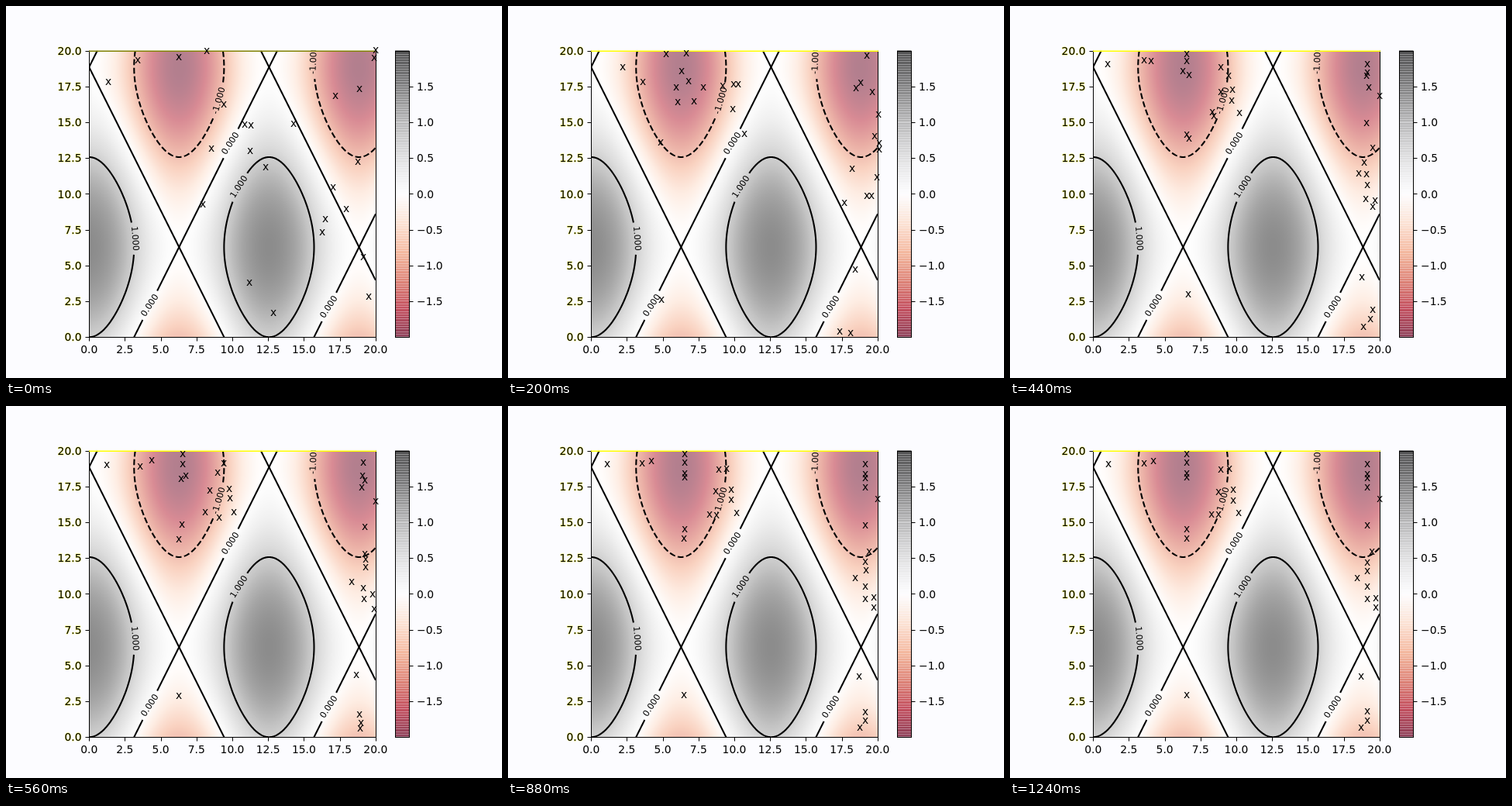
These frames come from a looping animation (640x480 px, 1.28 s). An HTML page with a canvas:

```html
<!DOCTYPE html>
<html lang="en">
<head>
<meta charset="utf-8">
<title>Swarm on a contour map</title>
<style>
html, body { margin: 0; width: 100%; height: 100%; overflow: hidden; background: #fcfcff; }
canvas { display: block; }
</style>
</head>
<body>
<canvas id="stage" width="640" height="480"></canvas>
<script>
const W = 640, H = 480, STEP = 40, STEPS = 32;
const L = 107.2, T = 57.6, SIZE = 369.6, B = T + SIZE, UNIT = SIZE / 20;
const BAR = { x: 501.6, w: 18.5, bins: 256 };
const FONT = '"DejaVu Sans", sans-serif';
const PI = Math.PI, TAU = 2 * PI;
const px = x => L + x * UNIT;
const py = y => B - y * UNIT;
const snap = v => Math.round(v) + .5;
const field = (x, y) => Math.cos(x / 2) + Math.sin(y / 4);

const ramp = ['67001f', 'b2182b', 'd6604d', 'f4a582', 'fddbc7', 'ffffff',
  'e0e0e0', 'bababa', '878787', '4d4d4d', '1a1a1a']
  .map(h => [0, 2, 4].map(i => parseInt(h.slice(i, i + 2), 16)));

function tint(v) {
  const p = Math.min(9.999, Math.max(0, (v + 2) * 2.5));
  const i = Math.floor(p), f = p - i;
  return ramp[i].map((c, k) => c + (ramp[i + 1][k] - c) * f);
}

function layer(w, h) {
  const c = document.createElement('canvas');
  c.width = w;
  c.height = h;
  return c;
}

function heatmap() {
  const n = 370, c = layer(n, n), g = c.getContext('2d');
  const img = g.createImageData(n, n);
  for (let j = 0, o = 0; j < n; j++) {
    for (let i = 0; i < n; i++, o += 4) {
      const v = field((i + .5) / n * 20, 20 - (j + .5) / n * 20);
      img.data.set([...tint(v), 255], o);
    }
  }
  g.putImageData(img, 0, 0);
  return c;
}

// Contour captions: text, centre, angle in degrees
const captions = [
  ['1.000', 167, 300, 86], ['1.000', 300, 233, -57],
  ['0.000', 289, 177, -57], ['0.000', 185, 386, -57], ['0.000', 416, 388, -57],
  ['-1.000', 274, 122, -74], ['-1.000', 396, 70, -88]
];

const inside = v => v >= -.01 && v <= 20.01;
const captioned = (x, y) =>
  captions.some(([s, a, b]) => Math.hypot(x - a, y - b) < s.length * 3.2 + 4.5);

function curve(g, at, from, to, dash = []) {
  let pen = false;
  g.setLineDash(dash);
  g.beginPath();
  for (let i = 0; i <= 600; i++) {
    const [x, y] = at(from + (to - from) * i / 600);
    const X = px(x), Y = py(y);
    if (!inside(x) || !inside(y) || captioned(X, Y)) pen = false;
    else if (pen) g.lineTo(X, Y);
    else { g.moveTo(X, Y); pen = true; }
  }
  g.stroke();
  g.setLineDash([]);
}

// Closed level line |f| = 1 around a peak or a pit
const loop = (cx, cy) => a => {
  const s = Math.sin(a), c = Math.cos(a);
  return [cx + 2 * Math.acos(c * c) * Math.sign(s), cy + 4 * Math.acos(s * s) * Math.sign(c)];
};

function contours(g) {
  g.save();
  g.beginPath();
  g.rect(L, T, SIZE, SIZE);
  g.clip();
  g.lineWidth = 2.08;
  g.lineJoin = 'round';
  for (let k = -1; k <= 2; k++) {
    for (const s of [1, -1]) curve(g, y => [s * (y / 2 + PI) + 2 * TAU * k, y], 0, 20);
  }
  for (const cx of [0, 2 * TAU]) curve(g, loop(cx, TAU), 0, TAU);
  for (const cx of [TAU, 3 * TAU]) curve(g, loop(cx, 3 * TAU), 0, TAU, [7.7, 3.33]);
  g.font = '11.1px ' + FONT;
  g.textAlign = 'center';
  for (const [s, x, y, deg] of captions) {
    g.save();
    g.translate(x, y);
    g.rotate(deg * PI / 180);
    g.fillText(s, 0, 4);
    g.restore();
  }
  g.restore();
}

function segment(g, x1, y1, x2, y2) {
  g.beginPath();
  g.moveTo(x1, y1);
  g.lineTo(x2, y2);
  g.stroke();
}

function label(g, s, x, y, align, fringe) {
  g.textAlign = align;
  if (fringe) {
    g.save();
    g.strokeStyle = fringe;
    g.strokeText(s, x, y);
    g.restore();
  }
  g.fillText(s, x, y);
}

function axes(g) {
  g.lineWidth = 1;
  g.font = '13.89px ' + FONT;
  for (let v = 0; v <= 20; v += 2.5) {
    const x = snap(px(v)), y = snap(py(v)), s = v.toFixed(1);
    segment(g, x, 428, x, 432.5);
    segment(g, 102.5, y, 107, y);
    label(g, s, px(v), 448, 'center');
    label(g, s, 97.5, Math.round(py(v) + 5.2), 'right', 'rgba(255, 255, 0, .6)');
  }
  const right = snap(L + SIZE), bottom = snap(B);
  segment(g, 107.5, T, 107.5, bottom);
  segment(g, right, T, right, bottom + .5);
  segment(g, 107, bottom, right, bottom);

  const edge = snap(BAR.x + BAR.w);
  for (let v = -1.5; v <= 1.5; v += .5) {
    const y = py(10 + v * 5);
    segment(g, edge, snap(y), edge + 5, snap(y));
    label(g, (v < 0 ? '\u2212' : '') + Math.abs(v).toFixed(1), 530, Math.round(y + 5.2), 'left');
  }
  g.strokeRect(snap(BAR.x), snap(T), edge - snap(BAR.x), bottom - snap(T));
}

// Translucent bins overlap at their edges, which gives the fine stripes
function colorbar(g) {
  const h = SIZE / BAR.bins;
  g.globalAlpha = .5;
  for (let i = 0; i < BAR.bins; i++) {
    const y = Math.floor(B - (i + 1) * h);
    g.fillStyle = `rgb(${tint((i + .5) / BAR.bins * 4 - 2)})`;
    g.fillRect(502, y, BAR.w, Math.ceil(B - i * h) - y);
  }
  g.globalAlpha = 1;
}

function backdrop() {
  const c = layer(W, H), g = c.getContext('2d');
  g.fillStyle = '#fcfcff';
  g.fillRect(0, 0, W, H);
  g.fillStyle = '#fff';
  g.fillRect(L, T, SIZE, SIZE);
  g.globalAlpha = .5;
  g.drawImage(heatmap(), L, T, SIZE, SIZE);
  g.globalAlpha = 1;
  colorbar(g);
  g.fillStyle = g.strokeStyle = '#000';
  contours(g);
  axes(g);
  return c;
}

// Resting columns of the swarm: x, then the heights in it
const columns = [
  [127, 75], [173, 74], [185, 71], [228, 62, 73, 87, 92, 159, 171, 373],
  [260, 140], [269, 111, 140], [272, 82], [283, 81], [288, 108, 122], [295, 138],
  [448, 222], [453, 349, 415], [461, 75, 88, 93, 105, 154, 202, 213, 233, 249, 394, 406],
  [467, 188], [472, 248, 260], [477, 120]
];

let seed = 11;
function random() {
  seed = (seed * 16807) % 2147483647;
  return seed / 2147483647;
}

// Damped swing around a resting value
function swing(home, reach) {
  const amp = (random() + random() - 1) * reach;
  const period = 8.5 + random() * 1.5;
  return n => Math.round(home + amp * Math.exp(-.2 * n) * Math.cos(TAU * n / period));
}

const swarm = columns.flatMap(([x, ...ys]) =>
  ys.map(y => ({ x: swing(x, 110), y: swing(y, 130) })));

const g = document.getElementById('stage').getContext('2d');
const base = backdrop();
let shown = -1;

function draw(n) {
  g.drawImage(base, 0, 0);
  g.fillStyle = n ? '#ffff00' : '#808000';
  g.fillRect(107, 57.5, 371, 1.5);
  g.fillStyle = '#000';
  g.font = '13.89px ' + FONT;
  g.textAlign = 'center';
  for (const p of swarm) {
    const x = p.x(n), y = p.y(n);
    if (x >= 111 && x <= 481 && y >= 54 && y <= 424) g.fillText('x', x, y + 4);
  }
}

function tick() {
  const n = Math.floor(performance.now() / STEP) % STEPS;
  if (n !== shown) draw(shown = n);
  requestAnimationFrame(tick);
}
tick();
</script>
</body>
</html>
```
